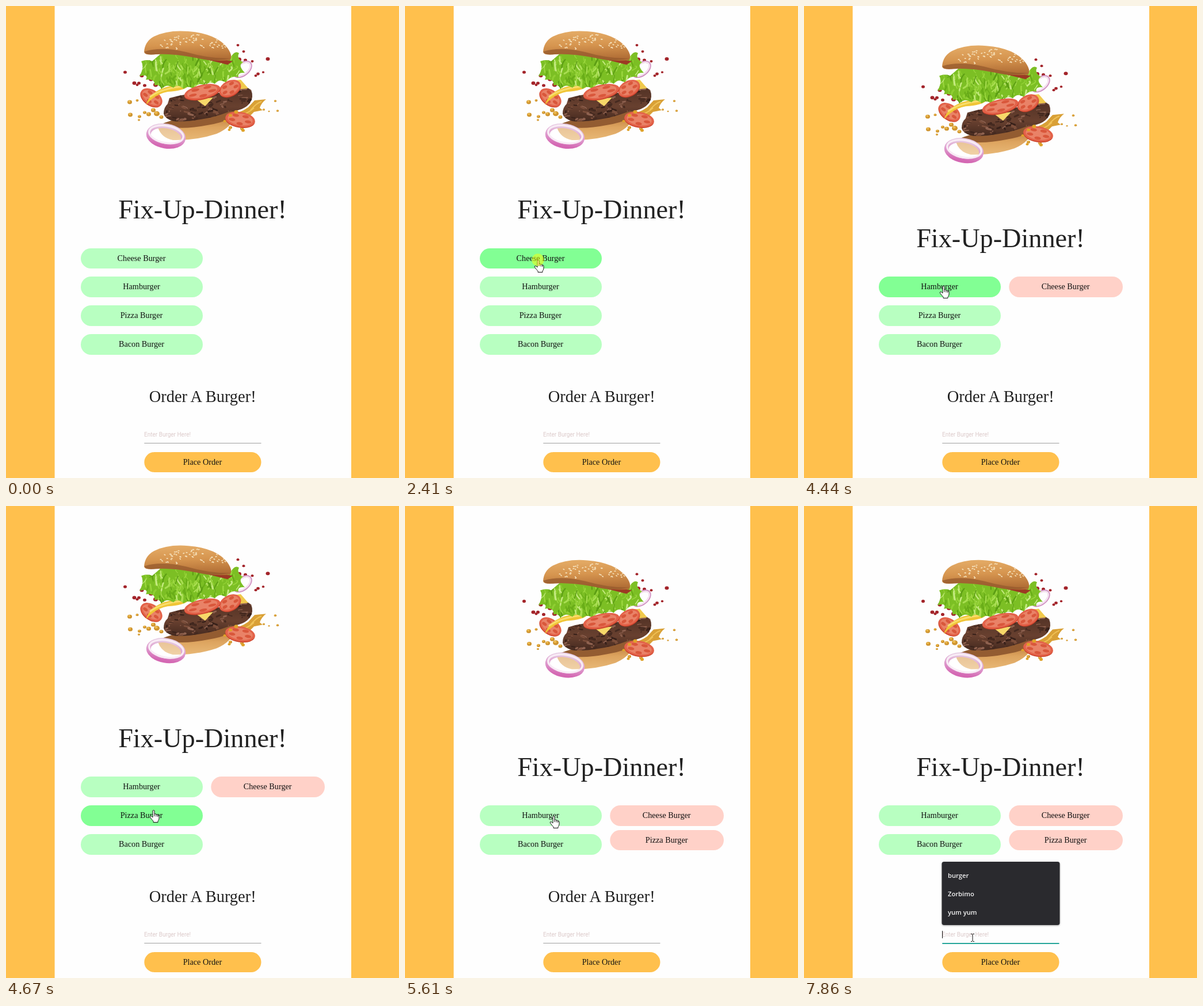
An HTML page that plays this animation: 683x820 px, repeating every 8000 ms.

```html
<!DOCTYPE html>
<html lang="en">
<head>
<meta charset="utf-8">
<title>Burger order page</title>
<style>
html, body { margin: 0; width: 100%; height: 100%; overflow: hidden; background: #ffc04d; }
svg { display: block; width: 683px; height: 820px; }
text { font-family: "Liberation Serif", "Times New Roman", serif; fill: #212121; }
.label { font-size: 14.22px; fill: #111; text-anchor: middle; }
.mid { text-anchor: middle; }
.hint { font: 10px Roboto, sans-serif; fill: #dccaca; }
.option { font: 600 11.2px "Open Sans", sans-serif; fill: #f4f4f4; }
</style>
</head>
<body>
<svg viewBox="0 0 683 820">
  <defs>
    <linearGradient id="bun" x1=".1" y1="0" x2=".2" y2="1">
      <stop offset="0" stop-color="#e5ad68"/><stop offset=".5" stop-color="#d6954f"/><stop offset="1" stop-color="#b06d35"/>
    </linearGradient>
    <linearGradient id="base" x2="0" y2="1">
      <stop offset="0" stop-color="#b9793a"/><stop offset=".5" stop-color="#dda45f"/><stop offset="1" stop-color="#e8b876"/>
    </linearGradient>
    <linearGradient id="meat" x2="0" y2="1">
      <stop offset="0" stop-color="#4f3024"/><stop offset=".6" stop-color="#68402f"/><stop offset="1" stop-color="#452a20"/>
    </linearGradient>
    <linearGradient id="ring" x2="0" y2="1">
      <stop offset="0" stop-color="#e6cbe2"/><stop offset=".5" stop-color="#dfa0d0"/><stop offset="1" stop-color="#d468b3"/>
    </linearGradient>
    <clipPath id="leafClip"><use href="#leaf"/></clipPath>
    <clipPath id="pattyClip"><use href="#patty"/></clipPath>
    <filter id="drop" x="-10%" y="-10%" width="120%" height="120%"><feDropShadow dx="0" dy="1" stdDeviation="1.5" flood-opacity=".35"/></filter>
  </defs>
  <rect width="683" height="820" fill="#ffc04d"/>
  <rect x="84.6" width="515.4" height="820" fill="#fefefe"/>

  <g id="burger">
    <g id="dropsBack"></g>
    <g transform="rotate(-38 411 110)">
      <ellipse cx="411" cy="110" rx="17" ry="10" fill="none" stroke="#cf8fc0" stroke-width="4"/>
      <ellipse cx="411" cy="110" rx="16" ry="9" fill="none" stroke="#f4e2f0" stroke-width="2.5"/>
    </g>
    <path d="M264 211Q300 192 398 188Q394 210 366 222Q330 234 290 233Q270 229 264 211Z" fill="url(#base)"/>
    <path d="M268 206Q310 188 400 180Q400 199 350 207Q300 217 268 206Z" fill="#935c31"/>
    <path d="M385 189Q406 187 421 176L432 164L452 162Q444 168 441 177L446 181L431 184L421 194L414 204Q405 195 385 189Z" fill="#d9a036"/>
    <path d="M425 181Q436 168 444 166M405 190Q421 187 431 177" fill="none" stroke="#f0c257" stroke-width="2"/>
    <path id="patty" d="M274 187Q274 176 281 170L284 160Q315 150 360 152Q395 149 411 136L426 146Q431 158 424 168Q416 181 387 184Q360 194 338 197Q310 202 291 200Q276 196 274 187Z" fill="url(#meat)"/>
    <g id="char" clip-path="url(#pattyClip)" fill="none" stroke-linecap="round"></g>
    <path d="M243 172Q251 146 286 139Q303 134 317 139Q310 147 281 149Q259 153 243 172Z" fill="#f0c536"/>
    <path d="M250 158Q269 144 304 140" fill="none" stroke="#f8dd6c" stroke-width="3"/>
    <path d="M330 162L346 174L360 159Z" fill="#f7d869"/>
    <path d="M399 129L408 128L421 143L401 145Z" fill="#f0c94c"/>
    <path id="leaf" d="M235 96Q246 92 254 96L270 82L389 92Q397 76 405 82Q400 91 412 98Q402 103 415 116Q401 115 404 124Q391 119 382 133Q371 125 363 135Q354 130 346 138Q330 131 328 146Q317 136 309 144Q298 134 291 142Q280 134 270 144Q267 135 258 138Q260 126 243 128Q249 117 232 122Q241 106 235 96Z" fill="#7cbf24"/>
    <g id="veins" clip-path="url(#leafClip)" fill="none" stroke-linecap="round"></g>
    <path d="M301 84Q348 87 394 96L385 102Q335 89 301 84Z" fill="#9c3a24"/>
    <path d="M240 80Q241 62 257 53Q281 41 317 44Q366 48 385 73Q395 87 389 94Q363 97 330 90Q289 82 260 84Q241 86 240 80Z" fill="url(#bun)"/>
    <path d="M241 79Q271 70 313 80Q355 92 390 91Q361 98 330 90Q286 82 260 84Q241 86 241 79Z" fill="#965a2d" opacity=".75"/>
    <g id="seeds" fill="#f6e2bc"></g>
    <g id="tomatoes"></g>
    <g id="dropsFront"></g>
    <g transform="rotate(10 278 226)">
      <ellipse cx="278" cy="226" rx="30.5" ry="17.5" fill="#fff" fill-opacity=".35" stroke="url(#ring)" stroke-width="8"/>
      <ellipse cx="278" cy="223" rx="30" ry="15" fill="none" stroke="#f8ebf5" stroke-width="3.5"/>
    </g>
  </g>

  <text id="title" class="mid" x="341.5">Fix-Up-Dinner!</text>
  <g id="buttons"></g>
  <text class="mid" x="341.7" y="687.7" font-size="28.44">Order A Burger!</text>
  <text class="hint" x="240" y="748">Enter Burger Here!</text>
  <rect id="line" x="240.3" y="759" width="203.2"/>
  <g id="order"></g>
  <g id="focus">
    <rect x="240" y="738" width="1" height="13" fill="#111"/>
    <rect x="239.5" y="618" width="205" height="110" rx="4" fill="#292a2d" filter="url(#drop)"/>
    <text class="option" x="250" y="646">burger</text>
    <text class="option" x="250" y="678">Zorbimo</text>
    <text class="option" x="250" y="710">yum yum</text>
  </g>
  <g id="pointer">
    <path id="arrow" d="M.5.5V15.5L4 12.2L6.3 17.2L8.8 16.1L6.5 11.3H11Z" fill="#fff" stroke="#111"/>
    <g id="hand" transform="translate(-6.5 0)" stroke="#111" stroke-linejoin="round">
      <path d="M5.5 13V2Q5.5.5 7 .5T8.5 2V7Q10.5 6 11.5 8Q13.3 7 14.2 9Q16.3 8.6 16.5 11V15Q16 18 14.5 19.5V21.5H6.5V19.5Q4 17 .8 12.5Q.3 10.4 2.5 10.6Q4 11.3 5.5 13Z" fill="#fff"/>
      <path d="M8.5 7V11M11.5 8V11.5M14.2 9V12" fill="none"/>
    </g>
    <path id="beam" d="M-3-6.5H-1L0-5.5L1-6.5H3M0-5.5V5.5M-3 6.5H-1L0 5.5L1 6.5H3" fill="none" stroke="#111"/>
    <circle id="click" r="10.7" fill="#ff0" opacity=".47"/>
  </g>
</svg>
<script>
const $ = id => document.getElementById(id);
const LOOP = 8000;

let seed = 11;
const rnd = (a = 0, b = 1) => {
  seed = (seed * 16807) % 2147483647;
  return a + (b - a) * seed / 2147483647;
};
const repeat = (n, make) => Array.from({ length: n }, (_, i) => make(i)).join('');
const dot = (x, y, r, fill) => `<ellipse cx="${x}" cy="${y}" rx="${r}" ry="${r * .85}" fill="${fill}"/>`;

function tomato(cx, cy, rx, ry, turn) {
  const pockets = repeat(5, i => {
    const a = i * Math.PI * .4 + .3;
    return `<ellipse cx="${rx * .57 * Math.cos(a)}" cy="${ry * .57 * Math.sin(a)}" rx="${rx * .22}" ry="${ry * .2}" fill="#d9573b"/>`;
  });
  return `<g transform="translate(${cx} ${cy}) rotate(${turn})">
    <ellipse cy="1.5" rx="${rx}" ry="${ry}" fill="#cb4029"/>
    <ellipse rx="${rx}" ry="${ry}" fill="#e36249"/>
    <ellipse rx="${rx * .84}" ry="${ry * .78}" fill="#e98267"/>${pockets}</g>`;
}

function drawBurger() {
  const red = [[207, 115, 3], [223, 134, 3.5], [231, 134, 3], [236, 121, 3.5], [228, 137, 2.5], [241, 138, 3],
    [252, 127, 4], [260, 137, 4], [403, 68, 2.5], [455, 92, 3.5], [438, 118, 2.8], [447, 115, 2.2],
    [413, 79, 2.5], [428, 96, 2.5], [405, 93, 4], [416, 94, 3], [434, 121, 2.5]];
  const gold = [[215, 167, 4], [228, 164, 2.5], [216, 189, 4], [232, 192, 3], [241, 185, 3], [248, 188, 4],
    [256, 181, 4], [262, 187, 5], [270, 193, 3.5], [231, 198, 2], [468, 165, 2.2], [472, 182, 2.2],
    [448, 180, 2], [410, 213, 3], [390, 211, 3], [457, 183, 1.5]];
  $('dropsBack').innerHTML = red.map(([x, y, r]) => dot(x, y, r, '#a3242a')).join('') +
    gold.map(([x, y, r]) => dot(x, y, r, '#cf9530') + dot(x - r * .2, y - r * .3, r * .5, '#eebb4e')).join('') +
    tomato(253, 159, 21, 13, 35);
  $('tomatoes').innerHTML = tomato(389, 143, 20, 13, -28) + tomato(341, 149, 32, 12, -13) + tomato(407, 197, 26, 13, 9);
  $('dropsFront').innerHTML = [[400, 184, 3.5], [390, 190, 3], [380, 200, 2.5], [388, 215, 2.5], [412, 216, 3]]
    .map(([x, y, r]) => dot(x, y, r, '#dfa229')).join('');

  $('seeds').innerHTML = repeat(60, () => {
    const a = rnd(3.4, 6.1), d = Math.sqrt(rnd(.15, .9));
    const x = 322 + 64 * d * Math.cos(a), y = 78 + 31 * d * Math.sin(a);
    return `<ellipse cx="${x}" cy="${y}" rx="1.7" ry=".9" transform="rotate(${rnd(-30, 60)} ${x} ${y})"/>`;
  });
  const stroke = (x, y, dx, dy, color, width) =>
    `<path d="M${x} ${y}q${dx * rnd(-1, 1)} ${dy / 3} ${dx} ${dy}" stroke="${color}" stroke-width="${width}"/>`;
  const greens = ['#5d9f14', '#8fce32', '#a9de52', '#69ad18', '#9ad63d', '#c4ea80'];
  $('veins').innerHTML = repeat(170, i =>
    stroke(rnd(234, 413), rnd(84, 141), rnd(-7, 7), rnd(5, 14), greens[i % 6], rnd(1, 3.2)));
  const browns = ['#38211a', '#7d4f3b', '#8f6250', '#452a20'];
  $('char').innerHTML = repeat(130, i =>
    stroke(rnd(274, 428), rnd(138, 200), rnd(-8, 8), rnd(-3, 4), browns[i % 4], rnd(1, 3.5)));
}

const GREEN = '#b8ffc1', HOVER = '#82ff94', PINK = '#ffd1c8', AMBER = '#ffc04d';
function button(x, y, w, fill, label) {
  const top = Math.round(y), height = Math.round(y + 35.56) - top;
  return `<rect x="${x}" y="${top}" width="${w}" height="${height}" rx="${height / 2}" fill="${fill}"/>` +
    `<text class="label" x="${x + w / 2 - .5}" y="${top + 22}">${label}</text>`;
}

const MENU = ['Cheese', 'Hamburger', 'Pizza', 'Bacon'];
const fullName = name => name === 'Hamburger' ? name : name + ' Burger';
const EATEN = [[], ['Cheese'], ['Cheese', 'Pizza']];

let shown = '';
function drawButtons(stage, hover) {
  if (shown === stage + hover) return;
  shown = stage + hover;
  const eaten = EATEN[stage];
  const open = MENU.filter(name => !eaten.includes(name));
  const rowY = i => 570 - 49.8 * (open.length - 1 - i);
  $('buttons').innerHTML =
    open.map((name, i) => button(130, rowY(i), 212, name === hover ? HOVER : GREEN, fullName(name))).join('') +
    eaten.map((name, i) => button(356.3, rowY(0) + 42.7 * i, 197.7, PINK, fullName(name))).join('');
  $('burger').setAttribute('transform', `translate(0 ${25.2 * stage})`);
  $('title').setAttribute('y', 369 + 49.8 * stage);
}

// Pointer stops: time, shape, hotspot x and y
const STOPS = [
  [0, '', 0, 0], [320, 'arrow', 625, 802], [400, 'arrow', 608, 795],
  [1400, 'hand', 238, 427], [1480, 'hand', 234, 436], [1550, 'hand', 231, 441],
  [4440, 'hand', 242, 486], [4510, 'hand', 247, 501], [4590, 'arrow', 252, 513],
  [4660, 'hand', 256, 528], [4740, 'hand', 258, 538],
  [6540, 'arrow', 252, 559], [6620, 'arrow', 246, 618], [6700, 'arrow', 262, 672],
  [6770, 'arrow', 279, 715], [6850, 'beam', 290, 741], [6930, 'beam', 293, 750]
];

function pointerAt(t) {
  if (t >= 630 && t < 1400) {
    const u = Math.min(1, (Math.floor((t - 630) / 76.7) + 1) / 10), v = 1 - u;
    const bend = (a, b, c) => Math.round(v * v * a + 2 * u * v * b + u * u * c);
    return ['arrow', bend(608, 570, 264), bend(795, 430, 409)];
  }
  return STOPS.filter(stop => stop[0] <= t).pop().slice(1);
}

const within = (t, a, b) => t >= a && t < b;
const show = (id, on) => $(id).setAttribute('visibility', on ? 'visible' : 'hidden');

function draw(t) {
  const stage = t < 2650 ? 0 : t < 5610 ? 1 : 2;
  const hover = within(t, 1400, 2650) ? 'Cheese'
    : within(t, 4440, 4590) ? 'Hamburger'
    : within(t, 4660, 5610) ? 'Pizza' : '';
  drawButtons(stage, hover);

  const [shape, x, y] = pointerAt(t);
  for (const id of ['arrow', 'hand', 'beam']) show(id, id === shape);
  $('pointer').setAttribute('transform', `translate(${x} ${y})`);
  show('click', within(t, 2410, 2500) || within(t, 5290, 5460) || within(t, 7710, 7860));

  const focused = t >= 7785;
  show('focus', focused);
  $('line').setAttribute('fill', focused ? '#26a69a' : '#9e9e9e');
  $('line').setAttribute('height', focused ? 2 : 1);
}

drawBurger();
$('title').setAttribute('font-size', 46.22);
$('order').innerHTML = button(240.3, 774.7, 203.2, AMBER, 'Place Order');
const start = performance.now();
function frame() {
  draw((performance.now() - start) % LOOP);
  requestAnimationFrame(frame);
}
frame();
</script>
</body>
</html>
```
